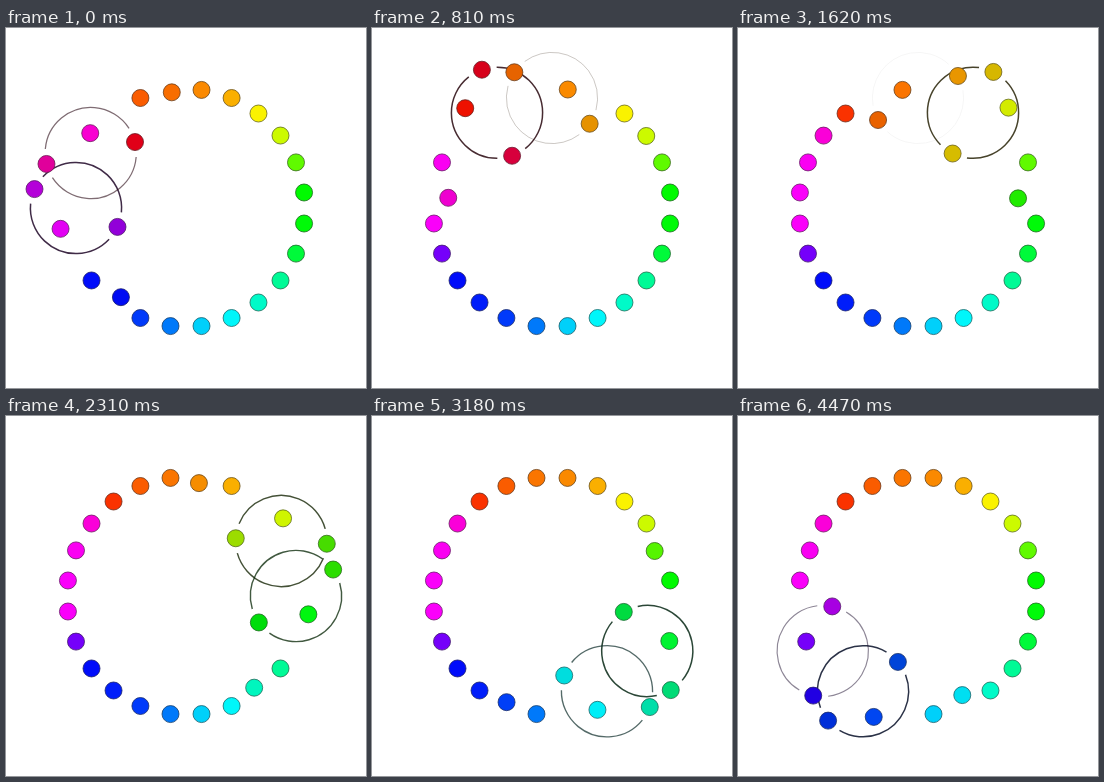
An HTML page with a canvas that plays this animation: 360x360 px, repeating every 4500 ms.

```html
<!DOCTYPE html>
<html lang="en">
<head>
<meta charset="utf-8">
<title>Colour wheel swaps</title>
<style>
  html, body { margin: 0; width: 100%; height: 100%; overflow: hidden; background: #fff; }
  canvas { display: block; width: 100%; height: 100%; }
</style>
</head>
<body>
<canvas id="stage" width="360" height="360"></canvas>
<script>
const ctx = document.getElementById('stage').getContext('2d');
const TAU = Math.PI * 2, RAD = Math.PI / 180;
const LOOP = 4500, TICK = 30;
const CYCLE = 5400, STAGGER = 450, SWAP = 1800, LEAD = 158;
const MID = 180, ORBIT = 110, ARM = 45.6, DOT = 8.5, GAP = 0.33;

// Hue of each of the 24 places on the wheel, clockwise from 7.5 degrees.
const hues = [122, 134, 156, 168, 181, 190, 211, 226, 233, 237, 268, 300,
              300, 302, 308, 372, 382, 388, 393, 402, 418, 431, 457, 480];

// Neighbouring groups overlap: each one swaps place 2k with place 2k + 3.
const groups = Array.from({ length: 12 }, (_, k) => {
  const angle = 30 + 30 * k;
  const from = hues[2 * k], to = hues[(2 * k + 3) % 24];
  return {
    x: MID + ORBIT * Math.cos(angle * RAD),
    y: MID + ORBIT * Math.sin(angle * RAD),
    start: (angle - 90) * RAD,
    delay: (k - 7) * STAGGER,
    from,
    turn: (to - from + 540) % 360 - 180
  };
});

const mod = (a, n) => ((a % n) + n) % n;

function drawRing(g) {
  const show = Math.min(1, Math.max(0, (Math.sin(Math.PI * g.u) - 0.72) / 0.22));
  if (!show) return;
  ctx.globalAlpha = 0.85 * show;
  ctx.strokeStyle = `hsl(${g.from + g.turn / 2}, 70%, 9%)`;
  ctx.lineWidth = 0.7 + 0.8 * show;
  for (const a of [g.angle, g.angle + Math.PI]) {
    ctx.beginPath();
    ctx.arc(g.x, g.y, ARM, a + GAP, a + Math.PI - GAP);
    ctx.stroke();
  }
  ctx.globalAlpha = 1;
}

function drawDot(g, angle, mix) {
  const hue = g.from + g.turn * mix;
  const light = 49 - 7 * Math.sin(Math.PI * mix);
  ctx.beginPath();
  ctx.arc(g.x + ARM * Math.cos(angle), g.y + ARM * Math.sin(angle), DOT, 0, TAU);
  ctx.fillStyle = `hsl(${hue}, 100%, ${light}%)`;
  ctx.fill();
  ctx.strokeStyle = `hsl(${hue}, 60%, 26%)`;
  ctx.lineWidth = 0.8;
  ctx.stroke();
}

function draw(t) {
  ctx.fillStyle = '#fff';
  ctx.fillRect(0, 0, 360, 360);
  for (const g of groups) {
    g.u = Math.min(1, mod(t + LEAD - g.delay, CYCLE) / SWAP);
    g.mix = (1 - Math.cos(Math.PI * g.u)) / 2;
    g.angle = g.start + Math.PI * g.mix;
  }
  groups.forEach(drawRing);
  for (const g of groups) {
    drawDot(g, g.angle, g.mix);
    drawDot(g, g.angle + Math.PI, 1 - g.mix);
  }
}

const begin = performance.now();
function frame() {
  const t = (performance.now() - begin) % LOOP;
  draw(Math.floor(t / TICK) * TICK);
  requestAnimationFrame(frame);
}
frame();
</script>
</body>
</html>
```
